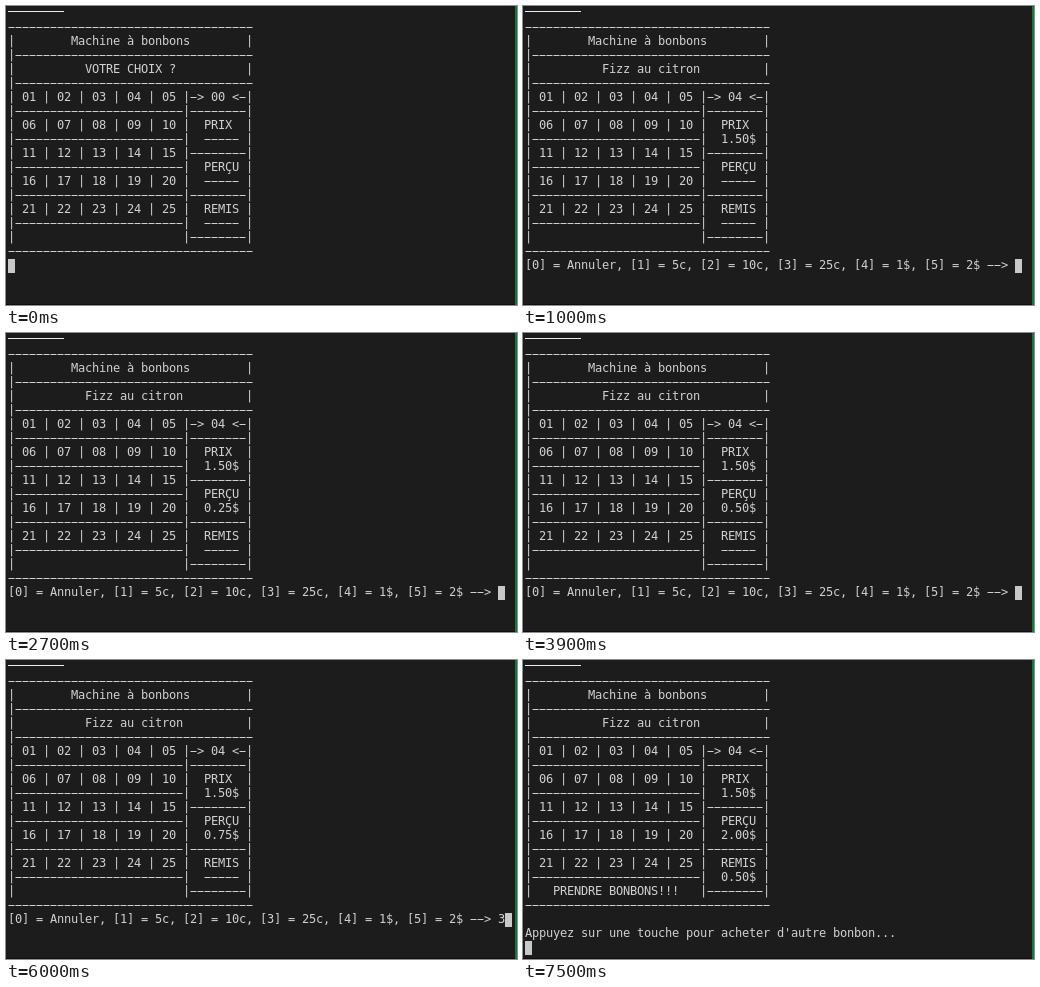
An HTML page with a canvas for the animation above (8 s loop, 511x299 px).

```html
<!DOCTYPE html>
<html lang="fr">
<head>
<meta charset="utf-8">
<title>Machine à bonbons</title>
<style>
html, body { margin: 0; width: 511px; height: 299px; overflow: hidden; background: #1c1c1c; }
canvas { display: block; }
</style>
</head>
<body>
<canvas id="stage" width="511" height="299"></canvas>
<script>
const ctx = document.getElementById('stage').getContext('2d');
const LOOP = 8000, CELL_W = 7, CELL_H = 14, LEFT = 2, TOP = 1;
const TEXT = '#d0d0d0';
const PROMPT = '[0] = Annuler, [1] = 5c, [2] = 10c, [3] = 25c, [4] = 1$, [5] = 2$ --> ';
const EMPTY = '-----';

// [time, state changes]
const steps = [
  [0, { title: 'VOTRE CHOIX ?', code: '00', price: EMPTY, paid: EMPTY, change: EMPTY, input: '', done: false }],
  [600, { input: '4' }],
  [1000, { title: 'Fizz au citron', code: '04', price: '1.50$', input: PROMPT }],
  [2400, { input: PROMPT + '3' }],
  [2700, { input: PROMPT, paid: '0.25$' }],
  [3600, { input: PROMPT + '3' }],
  [3900, { input: PROMPT, paid: '0.50$' }],
  [4800, { input: PROMPT + '3' }],
  [5100, { input: PROMPT, paid: '0.75$' }],
  [6000, { input: PROMPT + '3' }],
  [6400, { input: PROMPT, paid: '1.00$' }],
  [7200, { input: PROMPT + '4' }],
  [7500, { input: '', paid: '2.00$', change: '0.50$', done: true }]
];

function stateAt(t) {
  return Object.assign({}, ...steps.filter(s => s[0] <= t).map(s => s[1]));
}

function center(text, width) {
  const left = Math.ceil((width - text.length) / 2);
  return (' '.repeat(left) + text).padEnd(width);
}

function screen(s) {
  const rule = '-'.repeat(35);
  const bar = '|' + '-'.repeat(34);
  const side = [
    `-> ${s.code} <-`, '--------', '  PRIX  ', `  ${s.price} `,
    '--------', '  PERÇU ', `  ${s.paid} `, '--------',
    '  REMIS ', `  ${s.change} `, '--------'
  ];
  const rows = ['', rule, `|${center('Machine à bonbons', 33)}|`, bar,
    `|${center(s.title, 33)}|`, bar];
  side.forEach((cell, i) => {
    let left = '-'.repeat(24);
    if (i === 10) left = (s.done ? '   PRENDRE BONBONS!!!' : '').padEnd(24);
    else if (i % 2 === 0) {
      const first = i / 2 * 5 + 1;
      left = [0, 1, 2, 3, 4].map(n => ` ${String(first + n).padStart(2, '0')} `).join('|');
    }
    rows.push(`|${left}|${cell}|`);
  });
  rows.push(rule);
  if (s.done) rows.push('', "Appuyez sur une touche pour acheter d'autre bonbon...");
  rows.push(s.input);
  return rows;
}

function box(color, x, y, w, h) {
  ctx.fillStyle = color;
  ctx.fillRect(x, y, w, h);
}

function drawRow(text, row) {
  const y = TOP + row * CELL_H;
  [...text].forEach((ch, col) => {
    const x = LEFT + col * CELL_W;
    if (ch === '-') box(TEXT, x + 0.5, y + 6, 6, 1);
    else if (ch !== ' ') {
      ctx.fillStyle = TEXT;
      ctx.fillText(ch, x, y + 10);
    }
  });
}

function draw(t) {
  box('#1c1c1c', 0, 0, 511, 299);
  box('#120b16', 0, 298, 511, 1);
  box('#0b7a3b', 509, 0, 2, 299);
  box('#ececec', LEFT, 5, 8 * CELL_W, 1);
  ctx.font = '12px "DejaVu Sans Mono", monospace';
  const rows = screen(stateAt(t));
  rows.forEach(drawRow);
  const last = rows.length - 1;
  box('#c8c8c8', LEFT + rows[last].length * CELL_W, TOP + last * CELL_H, CELL_W, CELL_H);
}

let start = null;
function tick(now) {
  if (start === null) start = now;
  draw((now - start) % LOOP);
  requestAnimationFrame(tick);
}
draw(0);
requestAnimationFrame(tick);
</script>
</body>
</html>
```
